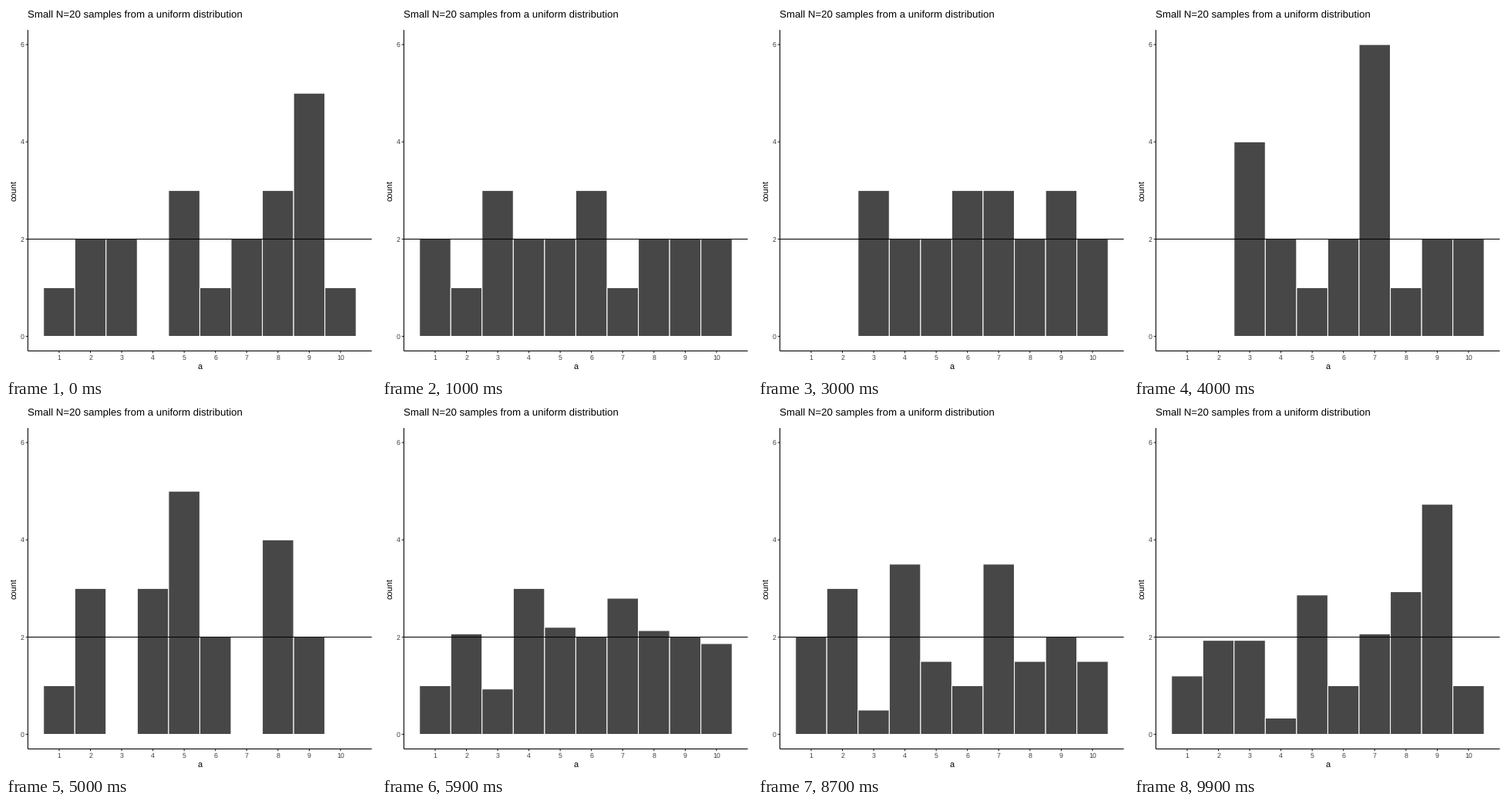
Write a matplotlib script that moves like this. It is 480 px wide and 480 px high and loops after 10 s.

```python
import math

import matplotlib.pyplot as plt
from matplotlib.animation import FuncAnimation
from matplotlib.patches import Rectangle

SIZE = 480
DPI = 100
PX = 72 / DPI  # one pixel in points

LEFT, RIGHT, TOP, BOTTOM = 28.4, 474.5, 31.1, 447.5
X_UNIT = (RIGHT - LEFT) / 11
Y_UNIT = (BOTTOM - TOP) / 6.6
ZERO = BOTTOM - 0.3 * Y_UNIT
LINE = 1.07

BAR_COLOR = "#474747"
TICK_COLOR = "#222222"
LABEL_COLOR = "#3d3d3d"

SAMPLES = [
    [1, 2, 2, 0, 3, 1, 2, 3, 5, 1],
    [2, 1, 3, 2, 2, 3, 1, 2, 2, 2],
    [0, 1, 2, 1, 3, 2, 5, 2, 4, 0],
    [0, 0, 3, 2, 2, 3, 3, 2, 3, 2],
    [0, 0, 4, 2, 1, 2, 6, 1, 2, 2],
    [1, 3, 0, 3, 5, 2, 0, 4, 2, 0],
    [1, 2, 1, 3, 2, 2, 3, 2, 2, 2],
    [2, 2, 3, 4, 3, 1, 3, 1, 0, 1],
    [0, 5, 0, 2, 2, 1, 4, 1, 3, 2],
    [4, 1, 1, 5, 1, 1, 3, 2, 1, 1],
]
STEP = 10  # frames per sample

plt.rcParams["font.family"] = "Liberation Sans"
plt.rcParams["text.hinting"] = "none"

fig = plt.figure(figsize=(SIZE / DPI, SIZE / DPI), dpi=DPI, facecolor="white")
ax = fig.add_axes([0, 0, 1, 1])
ax.set_xlim(0, SIZE)
ax.set_ylim(SIZE, 0)
ax.axis("off")


def x_pos(value):
    return LEFT + value * X_UNIT


def y_pos(count):
    return ZERO - count * Y_UNIT


def line(x0, y0, x1, y1, color="black"):
    ax.plot([x0, x1], [y0, y1], color=color, lw=LINE * PX, snap=False,
            solid_capstyle="butt", zorder=3)


def label(x, y, text, size, color="black", ha="center", rotation=0):
    ax.text(x, y, text, fontsize=size * PX, color=color, ha=ha, va="baseline",
            rotation=rotation, rotation_mode="anchor")


def ease(t):
    return (1 - math.cos(math.pi * t)) / 2


def counts_at(frame):
    index, offset = divmod(frame, STEP)
    hold = 4 if index else 3
    if index and offset == 0:
        return SAMPLES[index]
    t = ease(max(0, offset - hold) / (STEP - hold))
    now = SAMPLES[index]
    following = SAMPLES[(index + 1) % len(SAMPLES)]
    return [a + (b - a) * t for a, b in zip(now, following)]


bars = []
for value in range(1, 11):
    bar = Rectangle((x_pos(value - 0.5), ZERO), X_UNIT, 0, facecolor=BAR_COLOR,
                    edgecolor="white", lw=LINE * PX, snap=False,
                    joinstyle="miter", zorder=2)
    bars.append(ax.add_patch(bar))
    line(x_pos(value), BOTTOM, x_pos(value), BOTTOM + 2.75, TICK_COLOR)
    label(x_pos(value), 458.8, str(value), 8.8, LABEL_COLOR)

for count in (0, 2, 4, 6):
    y = y_pos(count)
    line(LEFT - 2.75, y, LEFT, y, TICK_COLOR)
    label(23.4, y + 3.15, str(count), 8.8, LABEL_COLOR, ha="right")

line(LEFT, y_pos(2), RIGHT, y_pos(2))
line(LEFT, TOP, LEFT, BOTTOM)
line(LEFT, BOTTOM, RIGHT, BOTTOM)

label(LEFT, 15, "Small N=20 samples from a uniform distribution", 13.2, ha="left")
label((LEFT + RIGHT) / 2, 472.2, "a", 11)
label(13.4, (TOP + BOTTOM) / 2, "count", 11, rotation=90)


def update(frame):
    for bar, count in zip(bars, counts_at(frame)):
        bar.set_y(y_pos(count))
        bar.set_height(count * Y_UNIT)
    return bars


anim = FuncAnimation(fig, update, frames=STEP * len(SAMPLES), interval=100,
                     repeat=True, repeat_delay=0, blit=False)
plt.show()
```
